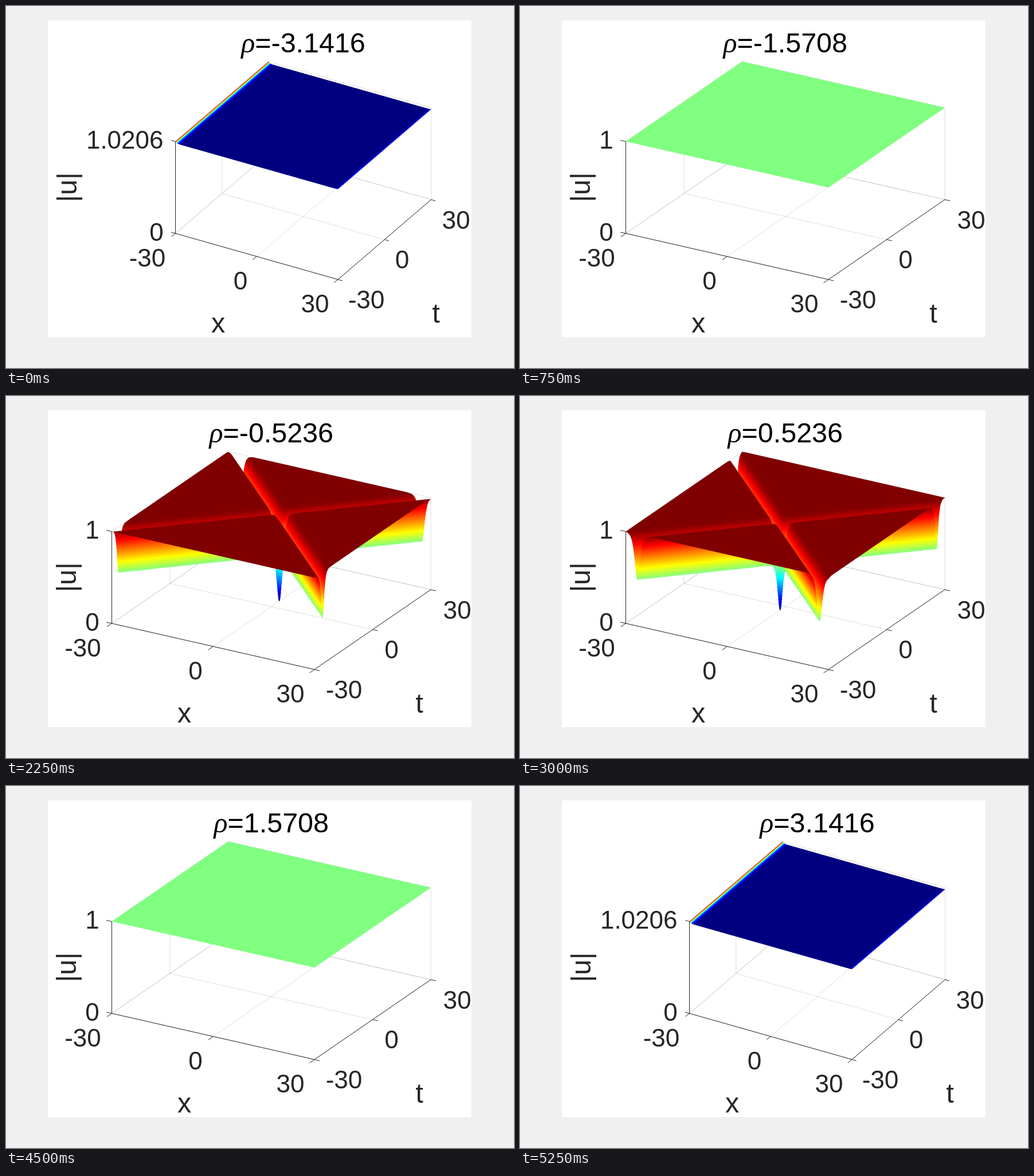
An HTML page with a canvas for the animation above (6000 ms loop, 886x632 px).

```html
<!DOCTYPE html>
<html lang="en">
<head>
<meta charset="utf-8">
<title>Two-soliton surface</title>
<style>
  html, body { margin: 0; width: 100%; height: 100%; overflow: hidden; background: #f0f0f0; }
  svg, canvas { position: absolute; left: 0; top: 0; width: 886px; height: 632px; }
  text { font-family: "Liberation Sans", Arial, sans-serif; text-anchor: middle; }
  .tick { font-size: 44px; fill: #262626; }
  .label { font-size: 48.4px; fill: #262626; }
  .title { font-size: 48.4px; fill: #000; }
  .rho { font-family: "Liberation Serif", "Times New Roman", serif; font-style: italic; font-size: 50px; }
</style>
</head>
<body>
<svg id="plot" viewBox="0 0 886 632"></svg>
<canvas id="surface" width="886" height="632"></canvas>
<script>
const W = 886, H = 632, HOLD = 750, SS = 2;
const PI = Math.PI;
const plot = document.getElementById("plot");
const ctx = document.getElementById("surface").getContext("2d");

// Screen frames of the two axis layouts: floor corner, edge vectors, label centres
const HEIGHT = 160.5;
const wide = {
  ox: 184.5, ax: 353.5, bx: 203, zMax: 1, zText: "1",
  zx: [150.5, 150.5], xs: [134, 330.5, 496], ts: [589.5, 672.5, 787],
  x: 311, t: 721, u: 109, zTick: [-9.5, -2], xTick: [-8.5, 6], tTick: [9, 2.2]
};
const narrow = {
  ox: 295.5, ax: 283.5, bx: 162.5, zMax: 1.0206, zText: "1.0206",
  zx: [262.5, 207.2], xs: [246.5, 409, 539], ts: [628.5, 691, 785],
  x: 370, t: 750, u: 110.5, zTick: [-7.5, -2], xTick: [-7, 5.5], tTick: [7.5, 2.3]
};
const OY = 397, AY = 80.5, BY = -139.5;

// Position from fractions along x, t and z
const at = (v, i, j, k) => [v.ox + v.ax * i + v.bx * j, OY + AY * i + BY * j - HEIGHT * k];

// Modulus of the two-dark-soliton solution, crossing at time -tau
function solitons(rho, tau) {
  const k = 2 * Math.cos(rho), s = Math.sin(rho);
  const c2 = Math.cos(2 * rho), s2 = Math.sin(2 * rho);
  return (x, t) => {
    const d = 2 * s * (t + tau);
    const e1 = Math.exp(k * (x - d)), e2 = Math.exp(k * (x + d));
    const both = 1 + s * s * e1 * e2;
    return Math.hypot(both - (e1 + e2) * c2, (e1 - e2) * s2) / (both + e1 + e2);
  };
}
const flat = () => 1;
const edge = x => 1 + 0.0206 * (Math.exp(-2 * (x + 30)) + 0.14 * Math.exp(2 * (x - 30)));

const third = 0.732;
const states = [
  { rho: -PI, view: narrow, f: edge, lo: 1, hi: 1.0206 },
  { rho: -PI / 2, view: wide, f: flat, lo: 0, hi: 2 },
  { rho: -PI / 3, view: wide, f: solitons(-PI / 3, -2.35), lo: third, hi: 1 },
  { rho: -PI / 6, view: wide, f: solitons(-PI / 6, -3.4), lo: 0, hi: 1 },
  { rho: PI / 6, view: wide, f: solitons(PI / 6, 3.4), lo: 0, hi: 1 },
  { rho: PI / 3, view: wide, f: solitons(PI / 3, 2.35), lo: third, hi: 1 },
  { rho: PI / 2, view: wide, f: flat, lo: 0, hi: 2 },
  { rho: PI, view: narrow, f: edge, lo: 1, hi: 1.0206 }
];

// Rainbow colour map, packed as ABGR
const ramp = (v, c) => Math.round(255 * Math.max(0, Math.min(1, 1.5 - Math.abs(4 * v - c))));
const jet = Uint32Array.from({ length: 513 }, (_, n) => {
  const v = n / 512;
  return (255 << 24 | ramp(v, 1) << 16 | ramp(v, 2) << 8 | ramp(v, 3)) >>> 0;
});
const colour = v => jet[Math.round(512 * Math.max(0, Math.min(1, v)))];

// Paint the height field column by column, from back to front
function render({ view: v, f, lo, hi }) {
  const big = document.createElement("canvas");
  big.width = W * SS;
  big.height = H * SS;
  const g = big.getContext("2d");
  const img = g.createImageData(big.width, big.height);
  const px = new Uint32Array(img.data.buffer);
  const first = Math.ceil(v.ox * SS), last = Math.floor((v.ox + v.ax + v.bx) * SS);
  for (let col = first; col < last; col++) {
    const sx = (col + 0.5) / SS - v.ox;
    const i0 = Math.max(0, (sx - v.bx) / v.ax), i1 = Math.min(1, sx / v.ax);
    if (i1 <= i0) continue;
    const depth = (i1 - i0) * (AY - BY * v.ax / v.bx);
    const n = Math.max(2, Math.ceil(depth * SS));
    let y0, z0;
    for (let m = 0; m <= n; m++) {
      const i = i0 + (i1 - i0) * m / n;
      const j = (sx - v.ax * i) / v.bx;
      const z = f(60 * i - 30, 60 * j - 30);
      const y = (OY + AY * i + BY * j - HEIGHT * z / v.zMax) * SS;
      if (m) {
        const a = Math.round(Math.min(y, y0)), b = Math.round(Math.max(y, y0));
        for (let r = a; r < b; r++) {
          const q = Math.max(0, Math.min(1, (r + 0.5 - y0) / (y - y0)));
          px[r * big.width + col] = colour((z0 + (z - z0) * q - lo) / (hi - lo));
        }
      }
      y0 = y;
      z0 = z;
    }
  }
  g.putImageData(img, 0, 0);
  return big;
}

function line(p, q, opacity) {
  return `<line x1="${p[0]}" y1="${p[1]}" x2="${q[0]}" y2="${q[1]}" stroke="#262626" stroke-opacity="${opacity}"/>`;
}
const text = (x, y, s, cls) => `<text x="${x}" y="${y}" class="${cls}">${s}</text>`;

function axes({ view: v, rho }) {
  const p = (i, j, k) => at(v, i, j, k);
  const tick = (a, d) => line(a, [a[0] + d[0], a[1] + d[1]], 1);
  let s = `<rect width="${W}" height="${H}" fill="#f0f0f0"/><rect x="73" y="25" width="738.5" height="553" fill="#fff"/>`;

  // Grid on the floor and the two back walls
  for (const h of [0, 0.5, 1]) {
    s += line(p(h, 0, 0), p(h, 1, 0), h ? 0.15 : 0.28);
    s += line(p(0, h, 0), p(1, h, 0), h === 1 ? 0.28 : 0.15);
    s += line(p(h, 1, 0), p(h, 1, 1), 0.15);
    s += line(p(0, h, 0), p(0, h, 1), 0.15);
  }
  s += line(p(0, 1, 1), p(1, 1, 1), 0.15) + line(p(0, 0, 1), p(0, 1, 1), 0.15);

  // Axis lines and ticks
  s += line(p(0, 0, 0), p(0, 0, 1), 1) + line(p(0, 0, 0), p(1, 0, 0), 1) + line(p(1, 0, 0), p(1, 1, 0), 1);
  for (const h of [0, 0.5, 1]) s += tick(p(h, 0, 0), v.xTick) + tick(p(1, h, 0), v.tTick);
  s += tick(p(0, 0, 0), v.zTick) + tick(p(0, 0, 1), v.zTick);

  ["-30", "0", "30"].forEach((n, i) => {
    s += text(v.xs[i], [455, 495, 535][i], n, "tick");
    s += text(v.ts[i], [528, 458, 389][i], n, "tick");
  });
  s += text(v.zx[0], 410, "0", "tick") + text(v.zx[1], 249, v.zText, "tick");
  s += text(v.x, 570, "x", "label") + text(v.t, 553, "t", "label");
  s += `<text class="label" transform="translate(${v.u + 12.5} 316.5) rotate(-90)">|u|</text>`;
  const mid = v.ox + (v.ax + v.bx) / 2;
  s += text(mid, 81, `<tspan class="rho">ρ</tspan>=${rho.toFixed(4)}`, "title");
  return s;
}

const scenes = states.map(s => ({ svg: axes(s), image: render(s) }));
let shown = -1;

function draw(ms) {
  const n = Math.floor(ms / HOLD) % scenes.length;
  if (n !== shown) {
    shown = n;
    plot.innerHTML = scenes[n].svg;
    ctx.clearRect(0, 0, W, H);
    ctx.imageSmoothingQuality = "high";
    ctx.drawImage(scenes[n].image, 0, 0, W, H);
  }
}

const start = performance.now();
function loop() {
  draw(performance.now() - start);
  requestAnimationFrame(loop);
}
loop();
</script>
</body>
</html>
```
